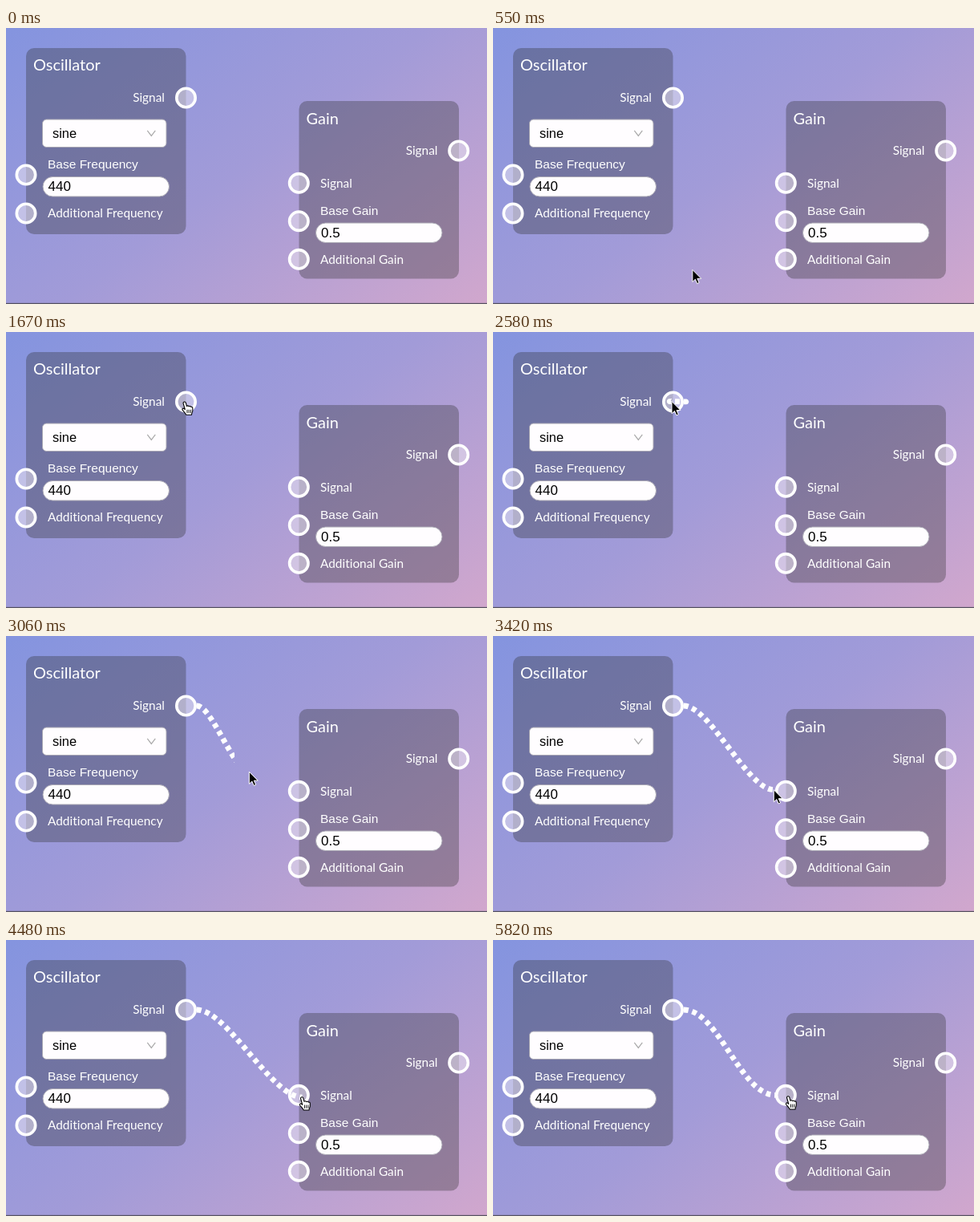
Recreate the animation shown at these times as an HTML page. Size 600 by 344 pixels, loop 5940 ms.

```html
<!DOCTYPE html>
<html lang="en">
<head>
<meta charset="utf-8">
<title>Connecting nodes</title>
<style>
html, body { margin: 0; width: 100%; height: 100%; overflow: hidden; }
body { background: linear-gradient(143deg, #8494df, #a29bd8 50%, #d1a7cd); }
svg { position: absolute; left: 0; top: 0; }
text { font: 15.4px Lato, sans-serif; font-variant-ligatures: none; fill: #fff; }
.title { font-size: 20px; }
.label { font: 15.5px "Liberation Sans", Arial, sans-serif; }
.value { font: 17px "Liberation Sans", Arial, sans-serif; fill: #000; }
.select { font-size: 16.4px; }
.end { text-anchor: end; }
.panel { fill: rgba(45, 45, 45, .33); }
.field { fill: #fffdff; stroke: #aaa8b4; }
.port { fill: rgba(235, 230, 242, .52); stroke: #fff; stroke-width: 3.6; }
#wire { fill: none; stroke: #fff; stroke-width: 6.8; stroke-dasharray: 5.8 4.9; }
</style>
</head>
<body>
<svg width="600" height="344" viewBox="0 0 600 344">
  <defs>
    <clipPath id="painted"><rect id="area" width="600" height="344"/></clipPath>
    <circle id="port" class="port" r="11.7"/>
  </defs>

  <rect class="panel" x="25" y="25" width="199.5" height="232" rx="10"/>
  <text class="title" x="34" y="53">Oscillator</text>
  <text class="end" x="198" y="92">Signal</text>
  <rect class="field" x="45.5" y="114" width="154.5" height="34.5" rx="5"/>
  <text class="value select" x="58" y="137">sine</text>
  <path d="M176.3 127.8l5 6.6 5-6.6" fill="none" stroke="#aaa" stroke-width="1.2"/>
  <text class="label" x="52" y="175">Base Frequency</text>
  <rect class="field" x="46" y="185.5" width="157.5" height="24.5" rx="12.2"/>
  <text class="value" x="52.5" y="203">440</text>
  <text x="52" y="236">Additional Frequency</text>

  <rect class="panel" x="365.5" y="91" width="199.5" height="221.5" rx="10"/>
  <text class="title" x="374.5" y="119.5">Gain</text>
  <text class="end" x="538.5" y="158">Signal</text>
  <text x="392" y="199">Signal</text>
  <text class="label" x="392" y="232.5">Base Gain</text>
  <rect class="field" x="386.5" y="243" width="157.5" height="24.5" rx="12.2"/>
  <text class="value" x="393" y="261">0.5</text>
  <text x="392" y="294">Additional Gain</text>

  <use href="#port" x="224.5" y="87"/>
  <use href="#port" x="25" y="183"/>
  <use href="#port" x="25" y="231"/>
  <use href="#port" x="564.7" y="153"/>
  <use href="#port" x="365.3" y="193.3"/>
  <use href="#port" x="365.3" y="240.7"/>
  <use href="#port" x="365.3" y="288.3"/>
  <rect y="342.8" width="600" height="1.2" fill="#55525f"/>

  <g clip-path="url(#painted)"><path id="wire"/></g>
  <g id="cursor">
    <path id="arrow" d="M0 0V15.2l3.5-3.3 2.3 5.4 2.5-1.1-2.3-5.2h4.9z" fill="#000" stroke="#fff"/>
    <g id="hand" stroke="#000" stroke-linecap="round" stroke-linejoin="round">
      <path d="M-2 1.5a1.7 1.7 0 0 1 3.3-.6l1.2 4.4c.8-1 2.4-.7 2.7.3.9-.7 2.2-.3 2.5.6 1-.4 2.1.2 2.1 1.5v3c0 2-1.3 3-1.3 5.3h-6.8c-.6-2-3-4-4.6-6-.8-1.2.6-2.7 2-1.7l1.2 1z" fill="#fff" stroke-width="1.1"/>
      <path d="M3 10v3.4M5.2 10v3.4M7.4 10v3.4" stroke-width=".9"/>
    </g>
  </g>
</svg>
<script>
const LOOP = 5940, PRESS = 2390, RELEASE = 4850, LAG = 30;
const START = [238, 87], PLUG = [352, 193.3];
// time, x, y of the pointer
const keys = [
  [0, 266, 350], [30, 265, 346], [620, 246, 292], [900, 227, 180],
  [1150, 219, 104], [1240, 221, 95], [1500, 223, 89], [1820, 223, 86.5],
  [2650, 223, 86.5], [2880, 229, 94], [2940, 243, 112], [3030, 282, 155],
  [3060, 303, 169], [3180, 331, 181], [3480, 352, 193], [3820, 355, 196.5],
  [4100, 362, 197], [4440, 369.5, 196], [4720, 369.5, 196],
  [5150, 368.5, 195], [LOOP, 368.5, 195]
];
const $ = id => document.getElementById(id);
const wire = $("wire"), area = $("area"), cursor = $("cursor"), arrow = $("arrow"), hand = $("hand");

const slope = (i, c) => (keys[i + 1][c] - keys[i][c]) / (keys[i + 1][0] - keys[i][0]);

// Harmonic mean keeps the curve from overshooting its keys
function tangent(i, c) {
  if (i === 0 || i === keys.length - 1) return 0;
  const a = slope(i - 1, c), b = slope(i, c);
  return a * b > 0 ? 2 * a * b / (a + b) : 0;
}

function pointer(t) {
  let i = 0;
  while (i < keys.length - 2 && t >= keys[i + 1][0]) i++;
  const a = keys[i], b = keys[i + 1], d = b[0] - a[0], u = (t - a[0]) / d;
  return [1, 2].map(c => {
    const s = u * u * (3 - 2 * u), v = 1 - u;
    return a[c] + (b[c] - a[c]) * s + d * u * v * (v * tangent(i, c) - u * tangent(i + 1, c));
  });
}

function curve([x, y], bend) {
  const [sx, sy] = START, dx = x - sx;
  const pull = dx >= 0 ? dx * bend : 3.6 * Math.sqrt(-dx);
  return `M${sx} ${sy}C${sx + pull} ${sy} ${x - pull} ${y} ${x} ${y}`;
}

const show = (el, on) => el.setAttribute("visibility", on ? "visible" : "hidden");

function draw(now) {
  const t = now % LOOP, p = pointer(t);
  const dragging = t >= PRESS && t < RELEASE;
  const overPort = (t >= 1110 && t < PRESS) || t >= 3500;

  cursor.setAttribute("transform", `translate(${p[0]} ${p[1]})`);
  show(arrow, !overPort);
  show(hand, overPort);

  show(wire, t >= PRESS);
  wire.setAttribute("d", dragging ? curve(p, .29) : curve(PLUG, .38));
  // While dragging, the painted area trails the pointer slightly
  const [lx, ly] = pointer(Math.max(0, t - LAG));
  area.setAttribute("width", dragging ? Math.max(250, lx + 2.5) : 600);
  area.setAttribute("height", dragging ? ly + 4 : 344);
  requestAnimationFrame(tick);
}

const begin = performance.now();
function tick() { draw(performance.now() - begin); }
tick();
</script>
</body>
</html>
```
